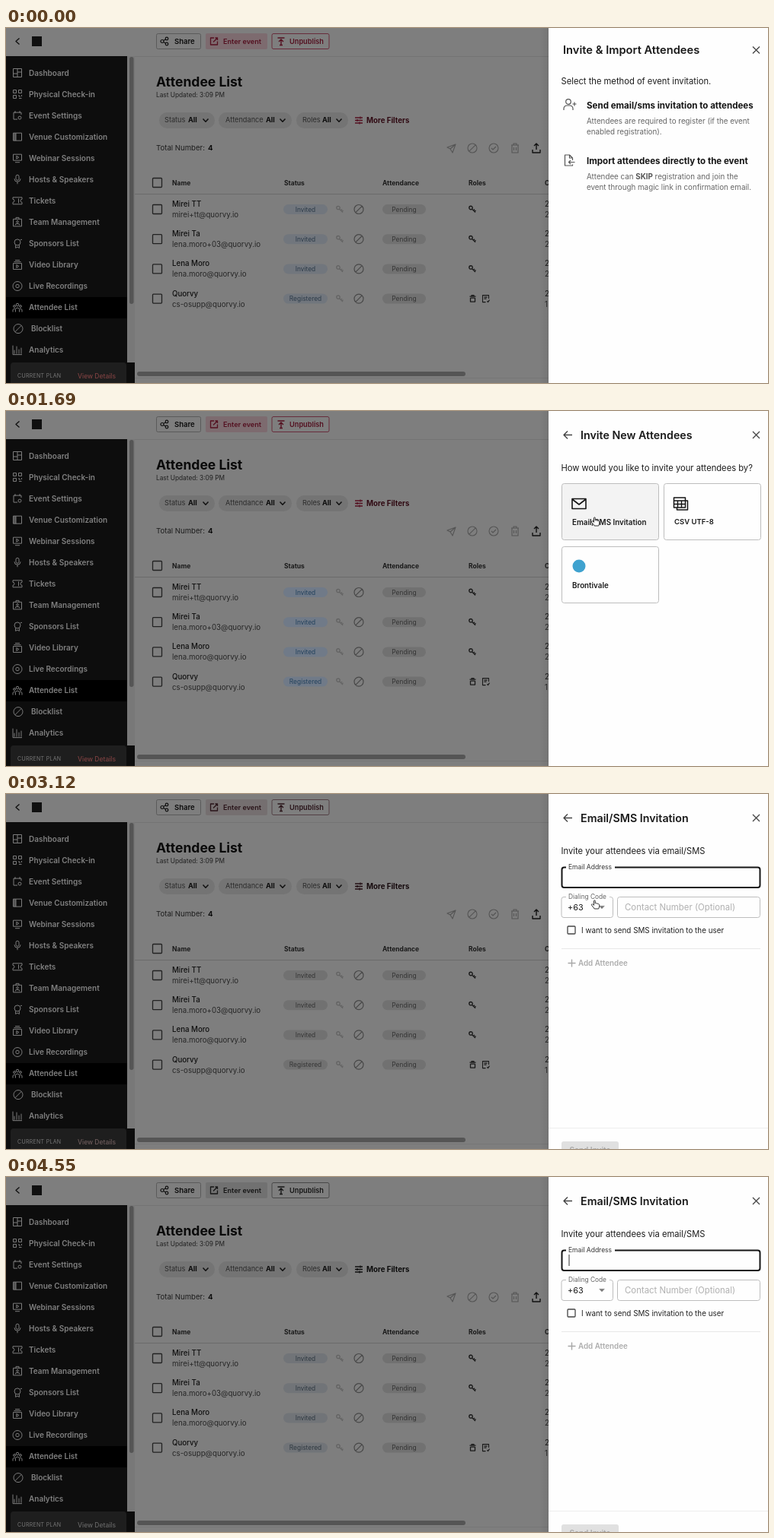
An HTML page with a canvas for the animation above (4.68 s loop, 1000 px wide and 467 px high).

```html
<!DOCTYPE html>
<html lang="en">
<head>
<meta charset="utf-8">
<title>Invite attendees</title>
<style>
  html, body { margin: 0; width: 100%; height: 100%; overflow: hidden; background: #7f7f7f; }
  canvas { display: block; width: 1000px; height: 467px; }
</style>
</head>
<body>
<canvas id="stage"></canvas>
<script>
const LOOP = 4680, STEP = 130, W = 1000, H = 467;
const canvas = document.getElementById('stage');
const c = canvas.getContext('2d');
const ratio = window.devicePixelRatio || 1;
canvas.width = W * ratio;
canvas.height = H * ratio;

const lerp = (a, b, p) => a + (b - a) * p;
const smooth = p => p * p * (3 - 2 * p);

// Value at time t from [time, value] keys
function key(t, keys, ease = p => p) {
  if (t <= keys[0][0]) return keys[0][1];
  for (let i = 1; i < keys.length; i++) {
    const [t0, a] = keys[i - 1], [t1, b] = keys[i];
    if (t < t1) return lerp(a, b, ease((t - t0) / (t1 - t0)));
  }
  return keys[keys.length - 1][1];
}

function mix(a, b, p) {
  const part = (s, i) => parseInt(s.slice(i, i + 2), 16);
  return 'rgb(' + [1, 3, 5].map(i => Math.round(lerp(part(a, i), part(b, i), p))).join() + ')';
}

// y is the middle of the capitals
function text(s, x, y, size, weight, color, align = 'left', spacing = 0) {
  c.font = `${weight} ${size}px Inter, "Open Sans", sans-serif`;
  c.letterSpacing = spacing + 'px';
  c.textAlign = align;
  c.fillStyle = color;
  c.fillText(s, x, y + size * 0.36);
}

function rect(x, y, w, h, color) {
  c.fillStyle = color;
  c.fillRect(x, y, w, h);
}

function box(x, y, w, h, r, fill, line, lw = 1) {
  c.beginPath();
  c.roundRect(x, y, w, h, r);
  if (fill) { c.fillStyle = fill; c.fill(); }
  if (line) { c.strokeStyle = line; c.lineWidth = lw; c.stroke(); }
}

function icon(d, x, y, color, lw = 1, fill) {
  const path = new Path2D(d);
  c.save();
  c.translate(x, y);
  c.lineJoin = 'round';
  if (fill) { c.fillStyle = fill; c.fill(path); }
  c.strokeStyle = color;
  c.lineWidth = lw;
  c.stroke(path);
  c.restore();
}

const ring = (x, y, r) => `M${x - r} ${y}a${r} ${r} 0 1 0 ${2 * r} 0a${r} ${r} 0 1 0 ${-2 * r} 0`;

const ICON = {
  block: ring(0, 0, 6) + 'M-4.2 4.2L4.2-4.2',
  check: ring(0, 0, 6) + 'M-3 0l2 2l4-4',
  plane: 'M-5-1L6-5L2 6L-1 1zM-1 1L6-5',
  trash: 'M-5-4H5M-2-4v-2h4v2M-4-4V6H4V-4M-1.5-1v4M1.5-1v4',
  upload: 'M0 2V-6M-3-3L0-6L3-3M-5 2v4H5V2',
  key: ring(-2, -2, 2.2) + 'M-.5-.5L4 4M1.5 1.5l1.5-1.5M3 3l1.5-1.5',
  shop: 'M-4-3H4M-3-1h6M-3-1v5H3v-5M-1.5-3v-1.5h3V-3',
  note: 'M4 0V-4.5H-4V4.5H0M-2-2H2M-2 0H1M2 3l1 1.5l2-3',
  sliders: 'M-5-3.5H5M-5 0H5M-5 3.5H5M2-5v3M-2-1.5v3M1 2v3',
  close: 'M-4.5-4.5L4.5 4.5M4.5-4.5L-4.5 4.5',
  back: 'M6 0H-5M0-5L-5 0L0 5',
  down: 'M-3.5-2L0 1.8L3.5-2',
  person: ring(-1, -4, 3.3) + 'M-7 7V5a4 4 0 0 1 4-4H1a4 4 0 0 1 4 4V7M4.5-1h5M7-3.5v5',
  file: 'M5 0V-3L1-7H-5V7H5V5.5M1-7v4H5M8 2.5H0M2.5 0L0 2.5L2.5 5',
  mail: 'M-9-6.5H9V6.5H-9zM-9-6L0 1L9-6',
  sheet: 'M-9-8H6V5H-9zM-9-4H6M-9 .5H6M-4-4V5M1-4V5M-5 5v3H9V-4H6',
  hand: 'M-2 5L-5 1.2C-5.6-.2-4-.8-3 .4L-2 1.4V-4.2C-2-5.6-.2-5.6-.2-4.2V-1C.2-1.8 1.6-1.6 1.7-.7C2.4-1.3 3.5-1 3.5-.1C4.4-.6 5.2 0 5.2 .8V3L4.2 6H-1.4z',
  arrow: 'M0 0V8.6L2 6.8L3.4 10L5 9.3L3.6 6.2H6.2z'
};

const MENU = [
  ['Dashboard', 'M-5.5-5.5H5.5V5.5H-5.5zM0-5.5V5.5M-5.5 1H0M0-1H5.5'],
  ['Physical Check-in', 'M-5.5-5.5h4v4h-4zM1.5-5.5h4v4h-4zM-5.5 1.5h4v4h-4zM1 2h2v2M5.5 1v2M2 5.5h3.5'],
  ['Event Settings', 'M5-1V-4H-5V5H0M-3-6v3M3-6v3' + ring(3, 3, 2)],
  ['Venue Customization', 'M-5.5-5H5.5V5H-5.5zM-4-5V5M-3-5V5M-2-5V5'],
  ['Webinar Sessions', 'M-5.5-5H5.5V3H-5.5zM-3 5.5H3M-1.2-3l3 2l-3 2z'],
  ['Hosts & Speakers', 'M-2-4a2 2 0 0 1 4 0v3a2 2 0 0 1-4 0zM-4-1a4 4 0 0 0 8 0M0 3v3'],
  ['Tickets', 'M-6-4.5H6v2.5a2 2 0 0 0 0 4v2.5H-6v-2.5a2 2 0 0 0 0-4zM1.5-3v6'],
  ['Team Management', 'M-5.5-4H5.5V5.5H-5.5zM-2-4v-2h4v2M-3 4a3 2 0 0 1 6 0' + ring(0, -.5, 1.3)],
  ['Sponsors List', ring(0, -1.5, 4) + 'M-2.4 2v4l2.4-1.4l2.4 1.4v-4M4-5h2'],
  ['Video Library', 'M-5.5-2H5.5V6H-5.5zM-4.5-4H4.5M-3-6H3M-1.2 0l3 2l-3 2z'],
  ['Live Recordings', ring(0, 0, 6) + ring(0, 0, 2.2)],
  ['Attendee List', ring(0, -3.5, 1.8) + ring(-4, -1.5, 1.4) + ring(4, -1.5, 1.4) + 'M-2.5 6V3a2.5 2.5 0 0 1 5 0v3M-6 6V3.5a2 2 0 0 1 3-1.5M6 6V3.5a2 2 0 0 0-3-1.5'],
  ['Blocklist', ICON.block],
  ['Analytics', 'M-4 5V0M-1 5V-5M2 5V-1M5 5V-3M-6-6V6H6']
];

const PEOPLE = [
  ['Mirei TT', 'mirei+tt@quorvy.io', 'Invited'],
  ['Mirei Ta', 'lena.moro+03@quorvy.io', 'Invited'],
  ['Lena Moro', 'lena.moro@quorvy.io', 'Invited'],
  ['Quorvy', 'cs-osupp@quorvy.io', 'Registered']
];

function sidebar(red) {
  rect(0, 37, 159, 430, '#0d0d0d');
  rect(0, 354, 159, 28, '#000000');
  MENU.forEach(([name, d], i) => {
    const y = 59 + i * 28.05, dx = name === 'Blocklist' ? 1 : 0;
    icon(d, 15 + dx, y, '#7c7c7c');
    text(name, 30 + dx * 3, y, 10, 600, '#808080');
  });
  rect(0, 438, 159, 29, '#0d0d0d');
  rect(159, 440, 10, 27, '#0d0d0d');
  box(6, 440, 152, 40, 4, '#1e1e1e');
  text('CURRENT PLAN', 15, 457.5, 7, 400, '#777777', 'left', 0.3);
  text('View Details', 94, 457.5, 8.5, 500, mix('#666666', '#7d4040', red));
}

function topbar(red) {
  icon('M2.5-4L-2 0L2.5 4', 15, 17.5, '#111111', 1.4);
  rect(34, 11, 13, 13, '#101010');
  box(197.5, 7.5, 58, 20, 2, null, '#5a5a5a');
  icon(ring(-3, 0, 2) + ring(3, -3.5, 1.8) + ring(3, 3.5, 1.8) + 'M-1.3-1L1.4-2.6M-1.3 1L1.4 2.6', 208, 17.5, '#111111', 1.2);
  text('Share', 221, 17.5, 9.5, 600, '#0c0c0c');
  const ink = mix('#161616', '#541020', red);
  box(262, 7, 81, 21, 2, mix('#717171', '#7d6b6f', red));
  icon('M0-4.5H-4.5V4.5H4.5V0M1.5-4.5h3v3M4.5-4.5L-1 1', 273, 17.5, ink, 1.3);
  text('Enter event', 285, 17.5, 9.1, 600, ink);
  box(349, 7.5, 75, 20, 2, null, mix('#484848', '#682c3b', red));
  icon('M-4.5-4.5H4.5M0 5V-2M-3 .5L0-2.5L3 .5M-2 5H2', 361, 17.5, ink, 1.4);
  text('Unpublish', 372, 17.5, 9.2, 600, ink);
}

function filters(red) {
  [['Status', 201, 73, 208, 239], ['Attendance', 279, 96, 288, 341], ['Roles', 381, 68, 389, 415]].forEach(([name, x, w, a, b]) => {
    box(x, 111, w, 21, 10.5, '#747474');
    text(name, a, 121, 9.2, 400, '#2c2c2c');
    text('All', b, 121, 9.2, 700, '#0c0c0c');
    icon(ICON.down, x + w - 12, 121.5, '#111111', 1.5);
  });
  icon(ICON.sliders, 463, 121.5, mix('#111111', '#551222', red), 1.3);
  text('More Filters', 473, 121.5, 9.7, 700, mix('#0c0c0c', '#300a13', red));
}

function pill(s, x, w, y, fill, ink) {
  box(x, y - 6.5, w, 13, 6.5, fill);
  text(s, x + w / 2, y, 8.4, 400, ink, 'center');
}

function table(blue) {
  const check = y => box(192.5, y - 6, 12, 12, 1, null, '#222222', 1.3);
  text('Total Number: ', 197, 158, 9.6, 400, '#1c1c1c');
  text('4', 265, 158, 9.6, 700, '#0c0c0c');
  ['plane', 'block', 'check', 'trash', 'upload'].forEach((n, i) =>
    icon(ICON[n], 584 + i * 28, 158, n === 'upload' ? '#111111' : '#555555', n === 'upload' ? 1.4 : 1.1));

  check(203.5);
  [['Name', 218], ['Status', 365], ['Attendance', 494], ['Roles', 607], ['C', 707]].forEach(([s, x]) =>
    text(s, x, 203.5, 8.5, 700, '#1a1a1a'));
  rect(169, 218, 543, 1, '#6b6b6b');

  PEOPLE.forEach(([name, mail, status], i) => {
    const y = 238.5 + i * 39.2;
    check(y);
    text(name, 218, y - 7, 9.7, 500, '#101010');
    text(mail, 218, y + 7, 9.7, 400, '#262626');
    pill(status, 364, 58, y, mix('#717171', '#707a88', blue), mix('#343434', '#21405c', blue));
    icon(ICON.key, 438, y, '#636363', 1.3);
    icon(ICON.block, 463, y, '#484848', 1.2);
    pill('Pending', 494, 57, y, '#717171', '#343434');
    if (i < 3) icon(ICON.key, 612, y, '#1a1a1a', 1.4);
    else {
      icon(ICON.shop, 612.5, y, '#1a1a1a', 1.3);
      icon(ICON.note, 629.5, y, '#1a1a1a', 1.1);
    }
    text('2', 707, y - 7, 9.7, 400, '#151515');
    text(i < 3 ? '2' : '1', 707, y + 7, 9.7, 400, '#262626');
  });
}

function page(t) {
  const red = key(t, [[2860, 1], [3120, 0.3], [3510, 0]]);
  const blue = key(t, [[1560, 0.5], [1690, 1], [2340, 1], [2470, 0.5], [2990, 0.4], [3120, 0], [4420, 0], [4550, 0.3]]);
  rect(0, 0, W, H, '#7e7e7e');
  rect(0, 37, W, 1, '#737373');
  rect(159, 37, 10, 430, '#787878');
  box(162, 38, 5.5, 325, 2.7, '#555555');
  topbar(red);
  sidebar(red);
  text('Attendee List', 197, 71, 17.5, 700, '#0a0a0a');
  text('Last Updated: 3:09 PM', 197, 88.5, 8.3, 400, '#202020');
  filters(red);
  table(blue);
  rect(169, 460, 543, 1, '#767676');
  box(172, 452, 431, 6, 3, '#555555');

  const shade = c.createLinearGradient(700, 0, 712, 0);
  shade.addColorStop(0, 'rgba(0,0,0,0)');
  shade.addColorStop(1, 'rgba(0,0,0,.07)');
  rect(700, 0, 12, H, shade);
  rect(712, 0, 288, H, '#fefefe');
}

function ripple(x, y, r, alpha, clip) {
  if (r <= 0 || alpha <= 0) return;
  c.save();
  c.beginPath();
  c.rect(...clip);
  c.clip();
  c.beginPath();
  c.arc(x, y, r, 0, 7);
  c.fillStyle = `rgba(0,0,0,${alpha})`;
  c.fill();
  c.restore();
}

const inside = (p, x, y, w, h) => p.x >= x && p.x < x + w && p.y >= y && p.y < y + h;

// Each panel returns true when the pointer is over something clickable
function methods(t, p) {
  const rows = [[712, 84, 288, 67], [712, 157, 288, 67]];
  const over = rows.find(r => inside(p, ...r));
  if (over) rect(...over, '#f3f3f3');
  const r = key(t, [[780, 0], [910, 24], [1040, 51], [1170, 92]]);
  ripple(836.5, 117, r, key(t, [[1040, 0.17], [1170, 0.1]]), rows[0]);

  text('Invite & Import Attendees', 731, 29, 14.7, 600, '#1a1a1a');
  icon(ICON.close, 984.5, 29, '#444444', 1.3);
  text('Select the method of event invitation.', 728.5, 69.5, 11.2, 400, '#1c1c1c');
  icon(ICON.person, 739, 101, '#555555', 1.2);
  text('Send email/sms invitation to attendees', 762, 102, 11.55, 700, '#151515');
  text('Attendees are required to register (if the event', 762, 122.5, 9.8, 400, '#666666');
  text('enabled registration).', 762, 136.5, 9.8, 400, '#666666');
  icon(ICON.file, 738.5, 174, '#555555', 1.2);
  text('Import attendees directly to the event', 762, 175, 11.55, 700, '#151515');
  text('Attendee can ', 762, 195.5, 9.8, 400, '#666666');
  let x = 762 + c.measureText('Attendee can ').width;
  text('SKIP', x, 195.5, 9.8, 700, '#555555');
  x += c.measureText('SKIP').width;
  text(' registration and join the', x, 195.5, 9.8, 400, '#666666');
  text('event through magic link in confirmation email.', 762, 209.5, 9.8, 400, '#666666');
  return !!over;
}

function heading(title, lead) {
  icon(ICON.back, 737, 31.5, '#444444', 1.4);
  text(title, 754, 32, 14.25, 600, '#1a1a1a');
  icon(ICON.close, 984.5, 31.5, '#444444', 1.3);
  text(lead, 728.5, 75, 11.2, 400, '#1c1c1c');
}

function cards(t, p) {
  heading('Invite New Attendees', 'How would you like to invite your attendees by?');
  const spots = [[729, 96], [863, 96], [729, 179]];
  let over = false;
  spots.forEach(([x, y]) => {
    const hit = inside(p, x, y, 127, 73);
    over = over || hit;
    box(x + 0.5, y - 0.5, 127, 74, 3, hit ? '#f3f3f3' : '#fefefe', '#bdbdbd');
  });
  if (t >= 2340) ripple(773, 142, 38, 0.15, [729, 96, 127, 73]);
  icon(ICON.mail, 752, 122, '#151515', 1.6);
  text('Email/SMS Invitation', 743, 146, 9.8, 600, '#1c1c1c');
  icon(ICON.sheet, 885.5, 122, '#151515', 1.5);
  text('CSV UTF-8', 877, 146, 9.5, 600, '#1c1c1c');
  c.beginPath();
  c.arc(752, 204, 8.5, 0, 7);
  c.fillStyle = '#3fa2cf';
  c.fill();
  text('Brontivale', 743, 229, 9.8, 600, '#1c1c1c');
  return over;
}

function form(t, p) {
  heading('Email/SMS Invitation', 'Invite your attendees via email/SMS');
  const up = key(t, [[2470, 0.2], [2600, 0.85], [2730, 1]]);
  const set = key(t, [[2470, 0], [2730, 1]]);

  box(729.5, 96.5, 260, 26.5, 3, null, '#151515', 2);
  if (up > 0.5) rect(735, 94, 64, 4, '#fefefe');
  text('Email Address', 738, lerp(109, 95.5, up), lerp(11.1, 8.5, up), 400, mix('#b8b8b8', '#333333', up));
  if (Math.floor((t - 2470) / 520) % 2 === 0) rect(738.5, 102, 1, 15, '#333333');

  box(729, 135.5, 67.5, 27, 3, null, set < 1 ? '#222222' : '#bdbdbd');
  if (set > 0.4) rect(735, 133.5, 57, 4, '#fefefe');
  text(set > 0.4 ? 'Dialing Code' : 'Dialing', 738, lerp(149, 135, set), lerp(11.2, 8.3, set), 400, mix('#b8b8b8', '#666666', set));
  if (set === 1) text('+63', 737, 149, 10.9, 400, '#1c1c1c');
  icon('M-3.5-1.8H3.5L0 1.9z', 782, 149, '#777777', 0.3, '#777777');

  box(802.5, 135.5, 187, 27, 3, null, '#bdbdbd');
  text('Contact Number (Optional)', 812, 149, 11.4, 400, '#b0b0b0');
  box(737, 174, 10, 10, 1, null, '#444444', 1.3);
  text('I want to send SMS invitation to the user', 755, 179.5, 9.85, 400, '#222222');
  rect(729, 203, 261, 1, '#e8e8e8');
  icon('M-5 0H5M0-5V5', 742.5, 222.5, '#a8a8a8', 1.4);
  text('Add Attendee', 751, 222.5, 9.8, 600, '#adadad');

  rect(712, 439, 288, 1, '#ededed');
  box(729, 457, 75, 30, 3, '#e0e0e0');
  text('Send Invite', 766.5, 468.5, 10, 600, '#a8a8a8', 'center');
  return inside(p, 729, 135, 68, 28);
}

function pointer(t) {
  return {
    x: key(t, [[130, 800], [780, 836.5], [1430, 836.5], [1690, 773], [3120, 773], [3640, 759], [4160, 748]], smooth),
    y: key(t, [[130, 482], [780, 120], [1430, 120], [1690, 144], [3120, 144], [3640, 284], [4160, 482]], smooth)
  };
}

function draw(now) {
  const t = Math.floor((now % LOOP) / STEP) * STEP;
  c.setTransform(ratio, 0, 0, ratio, 0, 0);
  const p = pointer(t);
  page(t);
  const panel = t < 1300 ? methods : t < 2470 ? cards : form;
  const hand = panel(t, p);
  if (p.y < 480) {
    if (hand) icon(ICON.hand, p.x + 0.5, p.y + 1, '#333333', 1, '#ffffff');
    else icon(ICON.arrow, p.x, p.y, '#ffffff', 0.8, '#111111');
  }
}

const start = performance.now();
function tick() {
  draw(performance.now() - start);
  requestAnimationFrame(tick);
}
tick();
</script>
</body>
</html>
```
